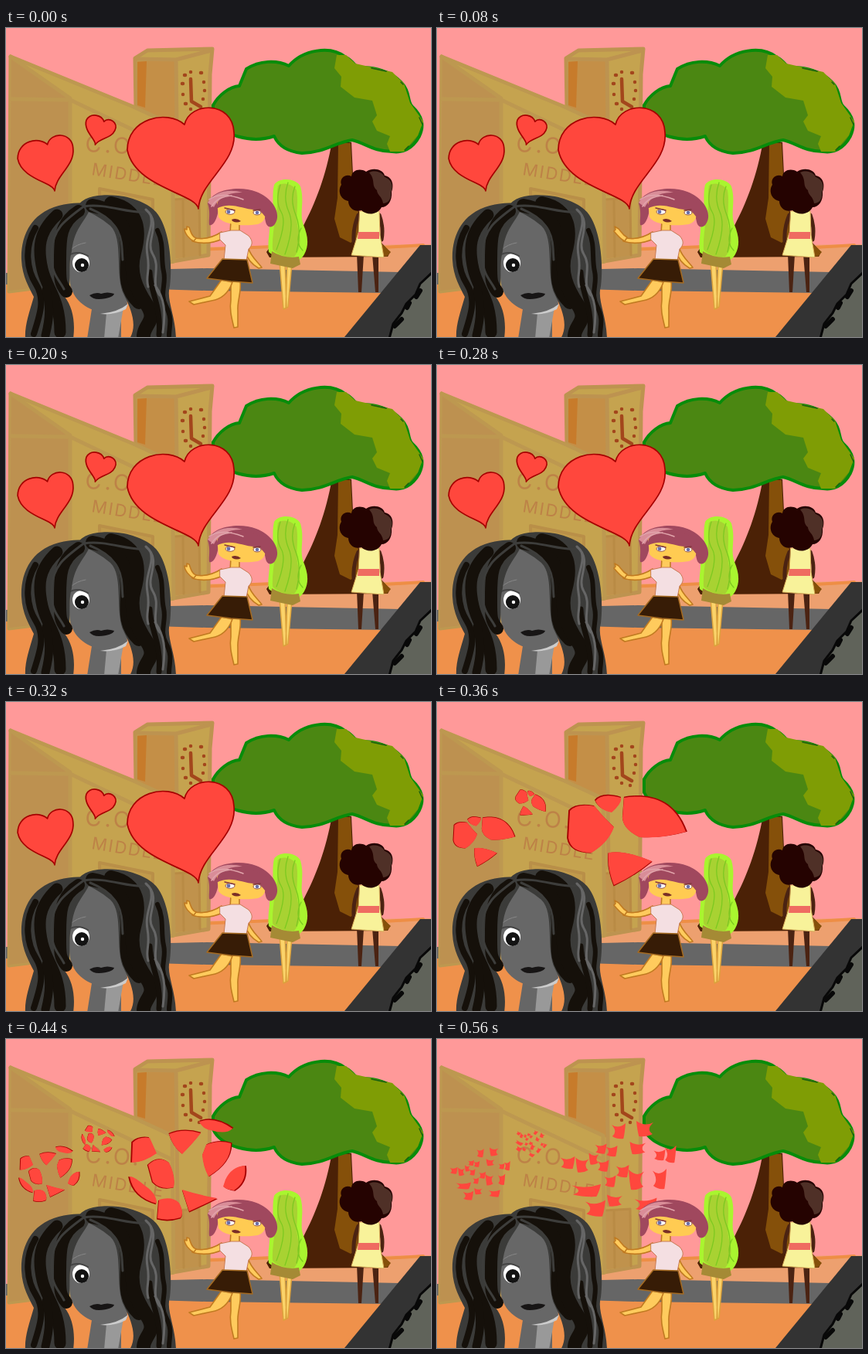
Recreate the animation shown at these times as an HTML page. Size 550x400 px, loop 0.6 s.

```html
<!DOCTYPE html>
<html lang="en">
<head>
<meta charset="utf-8">
<title>Breaking hearts</title>
<style>
  html, body { margin: 0; width: 100%; height: 100%; overflow: hidden; background: #ff9999; }
  svg { display: block; width: 550px; height: 400px; }
  path { stroke-linecap: round; stroke-linejoin: round; }
  .line { fill: none; }
  .heart { fill: #ff473d; }
  .rim { fill: #a50000; }
  .step { visibility: hidden; animation: 600ms step-end infinite; }
  .whole { animation-name: whole; stroke: #a50000; stroke-width: 1.7; }
  .split { animation-name: split; }
  .burst { animation-name: burst; }
  .shards { animation-name: shards; }
  .wave-in { animation-name: wave-in; }
  .wave-out { animation-name: wave-out; }
  @keyframes whole { 0% { visibility: visible } 60%, 100% { visibility: hidden } }
  @keyframes split { 0%, 73.333% { visibility: hidden } 60% { visibility: visible } 100% { visibility: hidden } }
  @keyframes burst { 0%, 93.333% { visibility: hidden } 73.333% { visibility: visible } 100% { visibility: hidden } }
  @keyframes shards { 0% { visibility: hidden } 93.333%, 100% { visibility: visible } }
  @keyframes wave-in {
    0%, 33.333%, 53.333%, 73.333% { visibility: visible }
    13.333%, 46.667%, 60%, 93.333%, 100% { visibility: hidden }
  }
  @keyframes wave-out {
    0%, 33.333%, 53.333%, 73.333% { visibility: hidden }
    13.333%, 46.667%, 60%, 93.333%, 100% { visibility: visible }
  }
</style>
</head>
<body>
<svg viewBox="0 0 550 400">
  <rect width="550" height="400" fill="#ff9999"/>

  <!-- Ground and road -->
  <path fill="#eda06f" d="M0 318L200 284 550 280V330H0Z"/>
  <path fill="#ef914b" d="M0 331L260 338 550 340V400H0Z"/>
  <path fill="#666" d="M0 317L260 311 515 316 494 343 260 340 0 332Z"/>
  <path class="line" stroke="#ee8e45" stroke-width="4" d="M250 287L345 283M490 284L540 281"/>
  <path fill="#333" d="M438 400L536 281H550V400Z"/>
  <path fill="#60635a" stroke="#080808" stroke-width="3" d="M496 402L501 383 512 369 518 357 530 345 536 331 552 316V402Z"/>
  <path class="line" stroke="#080808" stroke-width="6" d="M503 386L512 377M519 362L522 356M531 348L536 340"/>

  <!-- Tower -->
  <path fill="#c5a34f" stroke="#bd9350" stroke-width="5" d="M167 39L183 29 267 27 264 60 262 294 205 304 200 120 168 104Z"/>
  <path fill="#c48f47" d="M170 43L220 42 220 128 170 104Z"/>
  <path fill="#c77b2b" d="M170 44L182 43 180 103 170 100Z"/>
  <path class="line" stroke="#bd9350" stroke-width="5" d="M168 40L220 41 266 29M220 41L222 215"/>
  <path fill="#c0924c" d="M218 222L250 220 251 294 216 299Z"/>
  <path class="line" stroke="#b98b45" stroke-width="3" d="M229 223L230 296M218 222L250 220 251 294"/>
  <path class="line" stroke="#a3461c" stroke-width="4.5" d="M239 66L240 95 252 102"/>
  <path class="line" stroke="#a3461c" stroke-width="4.5" d="M231 61h1M239 57h0M252 58h1M256 70h0M257 81h0M255 92h0M250 108h0M239 105h0M232 98h1M229 86h0M228 72h1"/>

  <!-- School -->
  <path fill="#c5a34f" stroke="#bd9850" stroke-width="5" d="M6 37L165 102 215 125 217 302 83 331 4 341Z"/>
  <path fill="#bd9150" d="M7 38L83 91 83 331 4 340Z"/>
  <path class="line" stroke="#bd9850" stroke-width="5" d="M6 37L83 91 83 331M7 92L83 93 215 156"/>
  <path fill="#c19a4b" stroke="#b98f48" stroke-width="4" d="M121 208L190 222V300L122 315Z"/>
  <g fill="#bd8247" font-family="Inter, 'Open Sans', sans-serif">
    <text transform="translate(102 160) rotate(3)" font-size="29" letter-spacing="4">C.O.</text>
    <text transform="translate(110 190) rotate(9)" font-size="22" letter-spacing="2">MIDDLE</text>
  </g>

  <!-- Tree -->
  <path fill="#4b2106" d="M422 146L447 148 450 210 460 250 497 290 494 296 341 297 337 290 342 283 371 281C392 245 412 205 422 146Z"/>
  <path fill="#85500a" d="M430 149L446 149 448 190 456 240 455 272 446 278 432 271 425 247 429 220Z"/>
  <path fill="#85500a" d="M487 280L498 290 493 296 484 295Z"/>
  <path fill="#4b8712" stroke="#078c0a" stroke-width="4" d="M268 100C275 87 289 76 302 75L311 53C328 42 350 41 366 49C384 28 420 22 440 38C450 43 452 50 456 52C475 49 500 57 513 72C523 83 519 94 525 101C540 115 541 127 535 140C526 157 512 162 500 160C476 160 465 149 448 145C426 148 414 161 383 162C363 160 352 151 347 140C318 150 278 139 268 117Z"/>
  <path fill="#7f9d05" d="M428 35L440 35 452 46 474 51 500 57 515 72 523 97 540 121 533 139 515 160 497 160 493 150 497 140 480 133 474 121 480 113 474 94 451 90 433 76 434 63 425 52Z"/>
  <path class="line" stroke="#176010" stroke-width="1.5" d="M473 52L492 56M511 70l3 3M535 116l4 9M521 153l-5 5"/>

  <!-- Person in a yellow dress -->
  <path class="line" stroke="#4b2312" stroke-width="5" d="M456 242Q449 258 450 276M483 242Q489 258 486 274"/>
  <path fill="#4b2312" d="M454 292L463 293 460 342H456ZM474 293L482 293 482 342H478Z"/>
  <path fill="#f8f29a" stroke="#d8ad5a" stroke-width="1" d="M458 237H483L484 268 489 297 447 294 456 265Z"/>
  <path fill="#ef6b61" d="M456 264H483V273H455Z"/>
  <path fill="#250301" d="M447 192C448 184 458 181 466 186C475 180 488 183 490 191C501 193 502 205 499 212C500 224 494 232 486 232C481 242 467 243 460 236C450 239 443 232 443 224C432 222 429 210 434 203C431 194 440 188 447 192Z"/>
  <path fill="#4f3027" d="M470 187C480 183 488 188 490 193C501 197 501 207 498 213C499 222 494 227 488 227C487 218 480 216 480 210C472 203 479 198 470 187Z"/>

  <!-- Person with green hair -->
  <g stroke="#dca23c" stroke-width="1.5" fill="#fbd36a">
    <path d="M354 302L361 303 363 362 359 364ZM364 303L370 304 365 361 362 363Z"/>
  </g>
  <path fill="#a9f52f" d="M347 203C353 193 375 194 381 205C387 226 379 239 385 255C390 267 393 280 386 293C380 303 371 306 367 299C356 301 347 295 340 290C338 275 342 266 341 254C349 237 343 219 347 203Z"/>
  <path fill="#a8d232" d="M352 204C359 199 371 202 376 210C379 229 374 244 378 260C383 276 380 288 373 296C360 298 350 292 345 287C344 270 348 257 347 248C354 234 349 219 352 204Z"/>
  <path fill="#a58a35" d="M344 289Q360 299 379 296L381 306 371 311 342 305Z"/>
  <path class="line" stroke="#7cc920" stroke-width="1.3" d="M355 203Q348 225 356 238T350 287M365 200Q358 220 366 238T361 293M374 205Q367 222 375 242T376 290M382 259Q373 277 384 288"/>

  <g id="hearts"></g>

  <!-- Person with pink hair -->
  <g fill="#ffcb5d" stroke="#c17b21" stroke-width="1.6">
    <path d="M291 327L303 328C305 342 299 353 300 366L300 387 295 388C292 375 289 365 291 352Z"/>
    <path d="M279 326L293 329C288 343 279 351 266 353L243 358 237 354 264 347Z"/>
    <path d="M314 286C317 296 326 303 331 310L327 311C318 306 312 299 309 288Z"/>
    <path d="M279 264C268 271 255 275 241 271L241 276C257 281 272 277 282 272Z"/>
    <path class="step wave-in" d="M246 272C240 270 239 263 237 258L234 257 234 261 231 260C231 266 237 273 243 276Z"/>
    <path class="step wave-out" d="M246 271C240 268 238 263 235 260L230 257 231 261 229 263C233 268 237 273 243 276Z"/>
    <path d="M291 250L302 250 302 266 290 266Z"/>
  </g>
  <path fill="#a0485e" d="M261 227C268 208 303 204 324 212C345 220 356 239 349 252C346 259 338 260 336 251L331 227 276 225C275 243 270 257 263 255C262 248 265 239 261 227Z"/>
  <path fill="#ffcb52" d="M273 225C285 218 309 222 331 232C339 240 336 251 326 254C307 257 282 255 275 245Z"/>
  <path fill="#a0485e" d="M274 225C291 211 324 213 340 230L344 250C333 247 334 236 322 235C306 235 291 224 272 234Z"/>
  <path fill="#d98d98" d="M261 226C269 213 287 207 306 213C287 212 274 221 269 232Z"/>
  <path class="line" stroke="#e1a4ab" stroke-width="1.5" d="M263 222Q278 211 307 222M266 231Q274 218 292 217"/>
  <g fill="#fff" stroke="#975a4b" stroke-width="1">
    <ellipse cx="290" cy="238" rx="6" ry="3.3"/><ellipse cx="325" cy="239" rx="5" ry="3"/>
  </g>
  <g fill="#696fa9"><circle cx="288" cy="238" r="2.4"/><circle cx="325" cy="239" r="2.3"/></g>
  <path class="line" stroke="#82373d" stroke-width="1.5" d="M283 233L296 236M320 236L329 235"/>
  <path fill="#792e26" d="M292 248Q298 245 304 250Q299 253 293 250Z"/>
  <path fill="#f4dfe2" stroke="#c87a54" stroke-width="1" d="M277 265L291 262 303 262 314 269C321 277 318 282 314 286L311 301 282 300 284 281 277 274Z"/>
  <path fill="#371c06" stroke="#a46a21" stroke-width="1.5" d="M280 299L312 300 319 330 291 328 260 324Z"/>

  <!-- Person in the foreground -->
  <path fill="#666" d="M111 364H149V402H105Z"/>
  <path fill="#999" d="M130 369L152 362 145 402H127Z"/>
  <path fill="#676767" d="M98 231C126 223 148 251 154 290L157 360C143 372 125 372 113 365C92 357 82 341 82 320C82 289 85 255 98 231Z"/>
  <path fill="#ccc" d="M122 370Q145 368 158 357L155 364Q140 372 122 370Z"/>
  <ellipse cx="97" cy="304" rx="11" ry="12" fill="#fff"/>
  <circle cx="98" cy="307" r="9" fill="#131313"/>
  <circle cx="99" cy="307" r="2.2" fill="#fff"/>
  <path class="line" stroke="#444" stroke-width="2" d="M83 293Q94 288 106 295"/>
  <path class="line" stroke="#888" stroke-width="1" d="M84 287Q91 280 103 278"/>
  <path fill="#171515" d="M108 346Q117 341 123 344Q131 341 140 344Q138 350 120 351Q112 351 108 346Z"/>

  <path fill="#3b3b39" d="M106 228C92 224 62 228 45 241C24 256 19 282 20 300C21 322 30 336 36 348C30 369 24 385 25 402H87C90 380 86 361 76 348C87 337 79 310 85 289C88 260 101 252 108 236Z"/>
  <path fill="#3b3b39" d="M92 232C100 216 125 215 145 217C165 219 185 228 194 238C210 256 216 300 212 334C207 352 219 370 220 402H160C170 386 163 366 153 346C140 322 153 273 135 256Q116 240 92 232Z"/>
  <g class="line" stroke="#15100a">
    <path stroke-width="16" d="M94 237C70 252 70 273 70 299S69 330 78 341"/>
    <path stroke-width="15" d="M66 242C42 264 41 285 47 312S70 349 70 394"/>
    <path stroke-width="8" d="M38 259C23 284 27 313 39 332S44 371 36 396"/>
    <path stroke-width="11" d="M52 339C57 360 57 374 51 398"/>
    <path stroke-width="18" d="M112 230C151 237 156 261 157 286S150 334 172 355"/>
    <path stroke-width="18" d="M136 227C174 235 173 266 166 291S168 337 182 358 179 383 178 398"/>
    <path stroke-width="6" d="M196 262C205 280 200 298 204 315S198 343 207 360 211 386 211 398"/>
    <path stroke-width="7" d="M186 316C187 344 201 358 198 397"/>
  </g>
  <path class="line" stroke="#3d3d3b" stroke-width="3" d="M101 231C128 226 160 241 180 238M102 230C76 249 60 260 59 290S68 324 75 338M109 234C155 253 149 281 151 300"/>
  <path class="line" stroke="#666" stroke-width="3" d="M181 235C203 254 179 276 190 293S186 329 199 346M187 242C192 258 179 272 183 294S180 321 184 335M193 333C205 350 207 367 203 394"/>
</svg>

<script>
  const whole = "M249 234C246 214 167 207 157 158C157 117 208 105 231 125C238 95 293 94 295 135C299 175 251 198 249 234Z";

  const split = [
    "M172 141Q181 131 204 135Q216 150 229 162Q222 182 200 195Q173 195 170 176Z",
    "M205 128Q214 117 238 124Q240 131 226 143Q210 140 205 128Z",
    "M242 124C265 120 305 120 322 168Q290 177 262 175Q241 165 240 150Z",
    "M222 195Q243 191 278 206Q255 225 229 237Q220 215 222 195Z"
  ].join("");

  const burst = [
    "M164 134Q172 126 186 128L195 148Q178 160 163 160Z",
    "M211 123Q230 115 252 122Q242 135 228 149Q216 140 211 123Z",
    "M250 107Q270 100 293 116Q285 124 265 118Q255 117 250 107Z",
    "M259 137Q275 130 291 135Q292 160 262 178Q255 165 254 150Z",
    "M184 163Q197 150 211 160Q220 178 217 192Q200 196 190 185Z",
    "M160 178Q165 177 180 190Q195 200 195 213Q165 205 160 178Z",
    "M198 208Q215 203 224 212Q231 225 226 231Q210 236 196 232Z",
    "M228 195Q250 202 273 206Q255 215 237 223Z",
    "M284 182Q292 165 309 164Q312 185 295 196Q285 195 281 191Z"
  ].join("");

  // Centre x, centre y, width and height of each curved shard.
  const shardBoxes = [
    [235, 119, 18, 20], [269, 116, 22, 20], [212, 142, 15, 13], [226, 145, 15, 14],
    [260, 141, 21, 16], [302, 149, 15, 22], [288, 150, 15, 14], [203, 155, 13, 15],
    [215, 164, 15, 15], [169, 160, 19, 16], [188, 163, 17, 19], [240, 171, 17, 16],
    [224, 184, 15, 15], [258, 182, 20, 26], [288, 181, 18, 26], [193, 196, 38, 16],
    [230, 209, 20, 15], [205, 219, 26, 21], [270, 214, 29, 17]
  ];
  const shard = ([x, y, w, h], i) => {
    const side = i % 3 === 1 ? -1 : 1;
    const at = (u, v) => `${x + side * u * w} ${y + v * h}`;
    return `M${at(-.5, -.4)}Q${at(0, -.1)} ${at(.5, -.5)}Q${at(.45, .1)} ${at(.35, .5)}Q${at(-.1, .55)} ${at(-.45, .35)}Q${at(-.05, .05)} ${at(-.5, -.4)}Z`;
  };
  const shards = shardBoxes.map(shard).join("");

  // Draws one shape as the large heart, the left heart and the tilted small heart.
  // A rim shows dark only along the outer edge of the pieces.
  const trio = (name, d, [cx, cy], left, top, rim = 0) => {
    const draw = (x, y, sx, sy, turn = 0) => {
      const place = grow => `translate(${x} ${y}) rotate(${turn}) scale(${sx * grow} ${sy * grow}) translate(${-cx} ${-cy})`;
      const layer = (grow, kind) =>
        `<path class="${kind}" d="${d}" vector-effect="non-scaling-stroke" transform="${place(grow)}"/>`;
      return (rim ? layer(1 + rim, "rim") : "") + layer(1, "heart");
    };
    return `<g class="step ${name}">` + draw(cx, cy, 1, 1) + draw(...left, .52, .55) + draw(...top, .28, .29, 30) + "</g>";
  };

  document.getElementById("hearts").innerHTML =
    trio("whole", whole, [226, 167], [51, 174], [119.5, 131]) +
    trio("split", split, [246, 179], [61, 180.5], [120, 134], .025) +
    trio("burst", burst, [235, 168], [56, 174], [118.5, 131], .025) +
    trio("shards", shards, [235, 167], [56, 174], [120.5, 133]);
</script>
</body>
</html>
```
